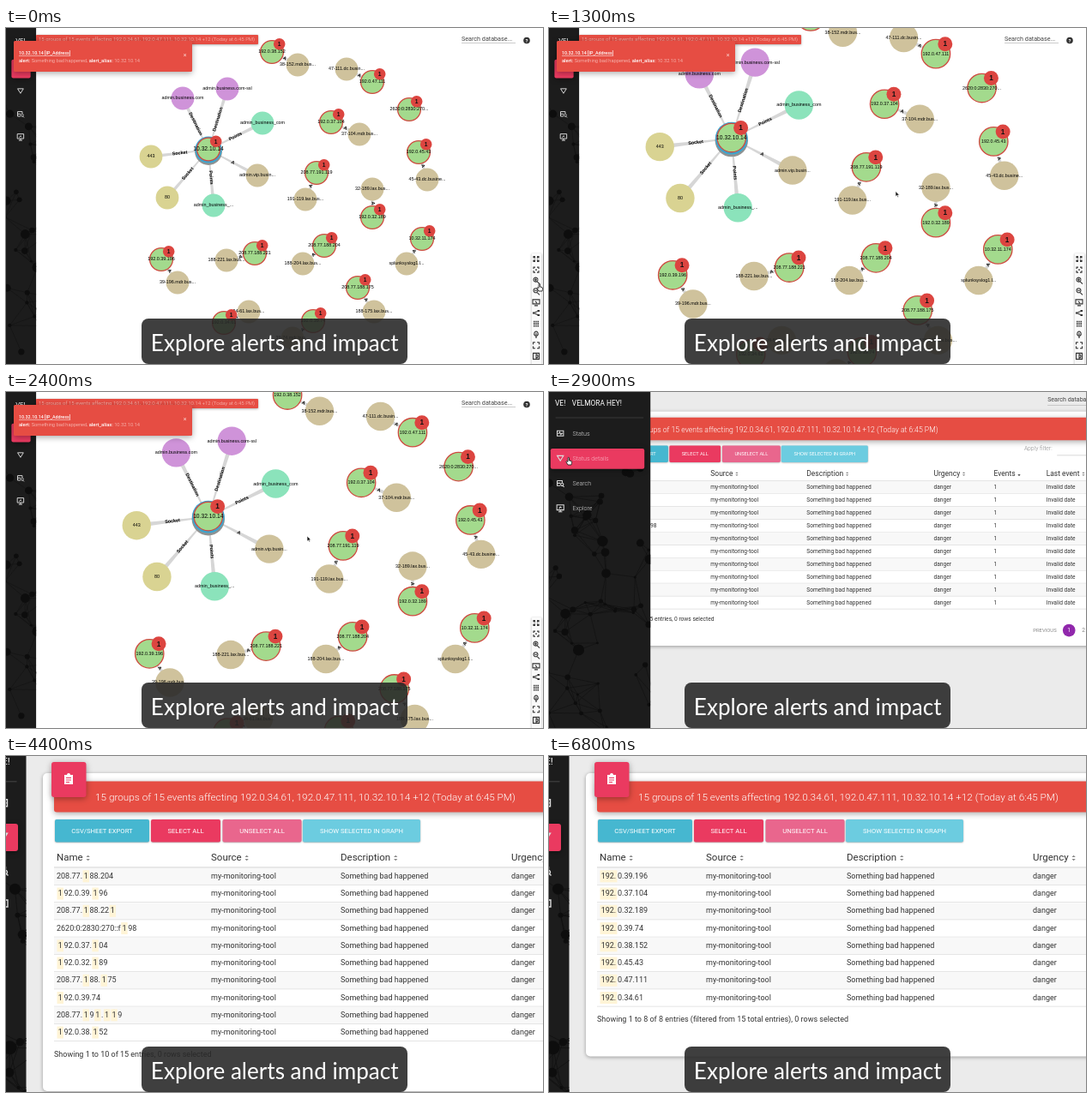
These frames come from a looping animation (626x392 px, 7100 ms). An HTML page with a canvas:

```html
<!DOCTYPE html>
<html lang="en">
<head>
<meta charset="utf-8">
<title>Alerts and impact</title>
<style>
html, body { margin: 0; width: 100%; height: 100%; overflow: hidden; background: #fff; }
canvas { display: block; width: 626px; height: 392px; }
</style>
</head>
<body>
<canvas id="stage" width="626" height="392"></canvas>
<script>
const ctx = document.getElementById('stage').getContext('2d');
const LOOP = 7100, TAU = Math.PI * 2;
const HEADLINE = '15 groups of 15 events affecting 192.0.34.61, 192.0.47.111, 10.32.10.14 +12 (Today at 6:45 PM)';
const RED = '#e64d43', PINK = '#ea3a60';

const clamp = v => Math.max(0, Math.min(1, v));
const progress = (t, from, to) => clamp((t - from) / (to - from));
const smooth = p => p * p * (3 - 2 * p);
const easeOut = (p, power) => 1 - (1 - p) ** power;
const mix = (a, b, p) => a + (b - a) * p;

// Drawing helpers
function text(s, x, y, size, color = '#333', { weight = 400, align = 'left', font = 'Roboto' } = {}) {
  ctx.font = `${weight} ${size}px "${font}", sans-serif`;
  ctx.textAlign = align;
  ctx.textBaseline = 'middle';
  ctx.fillStyle = color;
  ctx.fillText(s, x, y);
  return ctx.measureText(s).width;
}
function box(x, y, w, h, fill, radius = 0, shadow = 0) {
  ctx.save();
  if (shadow) {
    ctx.shadowColor = 'rgba(0,0,0,.35)';
    ctx.shadowBlur = shadow;
    ctx.shadowOffsetY = shadow / 4;
  }
  ctx.fillStyle = fill;
  ctx.beginPath();
  ctx.roundRect(x, y, w, h, radius);
  ctx.fill();
  ctx.restore();
}
function circle(x, y, r, fill, stroke, width = 1) {
  ctx.beginPath();
  ctx.arc(x, y, r, 0, TAU);
  if (fill) { ctx.fillStyle = fill; ctx.fill(); }
  if (stroke) { ctx.strokeStyle = stroke; ctx.lineWidth = width; ctx.stroke(); }
}
function path(d, x, y, scale, stroke, fill, width = 1) {
  ctx.save();
  ctx.translate(x, y);
  ctx.scale(scale, scale);
  const shape = new Path2D(d);
  if (fill) { ctx.fillStyle = fill; ctx.fill(shape); }
  if (stroke) { ctx.strokeStyle = stroke; ctx.lineWidth = width; ctx.stroke(shape); }
  ctx.restore();
}

// Graph
const GREEN = '#a3da8d', BEIGE = '#cfc29c', PURPLE = '#cf93d9', TEAL = '#8be3bb', YELLOW = '#d9d392';
const HUB = { x: 236, y: 142 };
const SPOKES = [
  [206, 82, PURPLE, 'admin.business.com', 'Destination'],
  [258, 71, PURPLE, 'admin.business.com-ssl', 'Destination'],
  [299, 111, TEAL, 'admin_business_com', 'Points'],
  [293, 172, BEIGE, 'admin.vip.busin...', 'A'],
  [242, 207, TEAL, 'admin_business_...', 'Points'],
  [188, 198, YELLOW, '80', 'Socket'],
  [169, 150, YELLOW, '443', 'Socket']
];
const PAIRS = [
  [310, 28, '192.0.38.152', 340, 43, '38-152.mdr.bus...'],
  [427, 63, '192.0.47.111', 397, 48, '47-111.dc.busin...'],
  [470, 95, '2620:0:2830:270...'],
  [379, 110, '192.0.37.104', 412, 124, '37-104.mdr.bus...'],
  [481, 145, '192.0.45.43', 491, 177, '45-43.dc.busine...'],
  [362, 169, '208.77.191.119', 349, 200, '191-119.lax.bus...'],
  [427, 221, '192.0.32.189', 427, 188, '32-189.lax.bus...'],
  [485, 246, '10.32.11.174', 467, 275, 'splunksyslog1.l...'],
  [371, 254, '208.77.188.204', 346, 275, '188-204.lax.bus...'],
  [290, 263, '208.77.188.221', 257, 271, '188-221.lax.bus...'],
  [181, 270, '192.0.39.196', 200, 297, '39-196.mdr.bus...'],
  [410, 303, '208.77.188.175', 429, 331, '188-175.lax.bus...'],
  [254, 344, '192.0.34.61', 283, 331, '34-61.lax.bus...'],
  [358, 342, '192.0.39.74', 334, 362, '39-74.mdr.bus...']
];

function drawGraph(zoom, pan) {
  const X = x => 330 + (x - 330) * zoom + pan.x;
  const Y = y => 196 + (y - 196) * zoom + pan.y;
  const r = 13.4 * zoom;
  const label = (s, x, y, size = 5.4, weight = 400) =>
    text(s, x, y, size, '#000', { weight, align: 'center', font: 'Liberation Sans' });

  function edge(leafX, leafY, x, y, name) {
    const dx = X(x) - X(leafX), dy = Y(y) - Y(leafY), angle = Math.atan2(dy, dx);
    ctx.save();
    ctx.translate(X(leafX), Y(leafY));
    ctx.rotate(angle);
    const length = Math.hypot(dx, dy), half = 2.1 * zoom;
    ctx.fillStyle = '#d6d6d6';
    ctx.beginPath();
    ctx.moveTo(0, -half); ctx.lineTo(length, -.5); ctx.lineTo(length, .5); ctx.lineTo(0, half);
    ctx.fill();
    ctx.translate(length / 2, 0);
    if (Math.abs(angle) > Math.PI / 2) ctx.rotate(Math.PI);
    label(name, 0, 0, 5.4, 700);
    ctx.restore();
  }
  function node(x, y, fill, name) {
    circle(X(x), Y(y), r, fill);
    label(name, X(x), Y(y));
  }
  function alertNode(x, y, name, size) {
    circle(X(x), Y(y), r, GREEN, '#cf4a40', 1.3);
    label(name, X(x), Y(y), size);
    const bx = X(x + 8.7), by = Y(y - 9.2);
    circle(bx, by, 6.8 * zoom, '#dc4540');
    text('1', bx, by + .4, 6.6 * zoom, '#111', { weight: 700, align: 'center', font: 'Liberation Sans' });
  }

  for (const [x, y, , , name] of SPOKES) edge(x, y, HUB.x, HUB.y, name);
  for (const [x, y, , bx, by] of PAIRS) if (bx) edge(bx, by, x, y, 'A');
  for (const [x, y, fill, name] of SPOKES) node(x, y, fill, name);
  for (const [x, y, name, bx, by, host] of PAIRS) {
    if (bx) node(bx, by, BEIGE, host);
    alertNode(x, y, name);
  }
  circle(X(HUB.x), Y(HUB.y + 2), r + 2.5, '#8f9292');
  circle(X(HUB.x), Y(HUB.y), r + 2.2, '#3aa5cf');
  alertNode(HUB.x, HUB.y - .5, '10.32.10.14', 6.7);
}

const TOOLS = [
  'M-3-3L-1-1M3-3L1-1M-3 3L-1 1M3 3L1 1M-3-1V-3H-1M1-3H3V-1M-3 1V3H-1M1 3H3V1',
  'M-3-1V-3H-1M1-3H3V-1M-3 1V3H-1M1 3H3V1M-.8 0H.8M0-.8V.8',
  'M2-1A2.5 2.5 0 1 1 2-1.1M1 1L4 4M-2-1H1M-.5-2.5V.5',
  'M2-1A2.5 2.5 0 1 1 2-1.1M1 1L4 4M-2-1H1',
  'M-4-3H4V2H-4ZM-2 4H2M-1-1L1 1',
  'M-3 0L3-2.5M-3 0L3 2.5M-3.5-.5H-2V.5H-3.5ZM2-3H3.5V-2H2ZM2 2H3.5V3H2Z',
  'M-3-2.5H-1.5M-.7-2.5H.7M1.5-2.5H3M-3 0H-1.5M-.7 0H.7M1.5 0H3M-3 2.5H-1.5M-.7 2.5H.7M1.5 2.5H3',
  'M-1 1.5C-4-1-1-4 0-3.5C1-4 4-1 1 1.5ZM-1 3.2H1M0-2V1',
  'M-3.5-1V-3.5H-1M1-3.5H3.5V-1M-3.5 1V3.5H-1M1 3.5H3.5V1',
  'M-3.5-3.5H3.5V3.5H-3.5ZM0-2A2 2 0 0 1 0 2Z'
];

function drawGraphPanels() {
  text('Search database...', 531, 13, 7.2, '#444');
  box(531, 17, 63, .7, '#bbb');
  circle(607, 14.5, 3.8, '#333');
  text('?', 607, 15, 6, '#fff', { weight: 700, align: 'center' });
  box(612.5, 263, 12, 135, '#fafafa', 1, 2);
  TOOLS.forEach((d, i) => path(d, 618, 269.5 + i * 12.6, 1, '#333', null, i === 6 ? 1.7 : 1.1));
}
function drawToasts() {
  box(35, 8, 259, 11, RED, 1, 3);
  text(HEADLINE, 38, 13.7, 6.05, '#f9cfca', { weight: 300 });
  box(9, 15, 208, 36, RED, 1.5, 7);
  const w = text('10.32.10.14 [IP_Address]', 15, 29, 5.35, '#fff', { weight: 500 });
  box(15, 32, w, .6, '#fff');
  let x = 15;
  for (const [s, weight] of [['alert: ', 500], ['Something bad happened, ', 300], ['alert_alias: ', 500], ['10.32.10.14', 300]])
    x += text(s, x, 38, 5.75, weight === 500 ? '#fff' : '#fbdad6', { weight });
  text('×', 208.5, 32, 7, '#fbdad6', { align: 'center' });
}

// Sidebar
let seed = 11;
const random = () => (seed = seed * 16807 % 2147483647) / 2147483647;
const WEB = Array.from({ length: 64 }, () => ({ x: -30 + random() * 175, y: 110 + random() * 450, r: 2 + random() ** 2 * 7 }));
const MENU = [
  ['Status', 'M-5-4H5V4H-5ZM-4 0H-2L-1-2L1 2L2 0H4'],
  ['Status details', 'M-5-4H5L0 4Z'],
  ['Search', 'M-5-4H3V-1M-5-4V4H0M-5 0H0M5 2A2.2 2.2 0 1 1 5 1.9M4 4L6 6'],
  ['Explore', 'M-5.5-5H5.5V3H-5.5ZM-3 6H3M0 3V6M-2 1L0-2L2 0']
];

function drawSidebar(width, labelAlpha, active) {
  ctx.save();
  ctx.beginPath();
  ctx.rect(-40, -30, width + 40, 620);
  ctx.clip();
  box(-40, -30, 200, 620, '#1c1c1c');
  ctx.strokeStyle = '#111';
  ctx.lineWidth = .8;
  ctx.beginPath();
  for (const a of WEB) for (const b of WEB)
    if (a.y < b.y && Math.hypot(a.x - b.x, a.y - b.y) < 52) { ctx.moveTo(a.x, a.y); ctx.lineTo(b.x, b.y); }
  ctx.stroke();
  for (const p of WEB) circle(p.x, p.y, p.r, '#0d0d0d');
  text('VE!', -12, 7, 11.5, '#fff');
  box(-11, 29.5, width, .8, '#555');
  box(-19, 79 - (active === 0 ? 39 : 0), width + 9.5, 32, PINK, 3, 6);
  const slide = (1 - labelAlpha) * 14;
  ctx.globalAlpha = labelAlpha;
  text('VELMORA HEY!', 15 - slide, 7, 11.3, '#fff');
  ctx.globalAlpha = 1;
  MENU.forEach(([name, icon], i) => {
    const y = 54.8 + i * 39.4;
    path(icon, -3.5, y, 1, '#ddd', null, 1.4);
    ctx.globalAlpha = labelAlpha;
    text(name, 16 - slide, y + .5, 9.6, i === active ? '#f9b3c2' : '#ddd', { weight: 300 });
    ctx.globalAlpha = 1;
  });
  ctx.restore();
}

// Table page, laid out at its closest camera position
const HOSTS = ['208.77.188.204', '192.0.39.196', '208.77.188.221', '2620:0:2830:270::f198', '192.0.37.104',
  '192.0.32.189', '208.77.188.175', '192.0.39.74', '208.77.191.119', '192.0.38.152', '192.0.45.43',
  '192.0.47.111', '192.0.34.61', '10.32.10.14', '10.32.11.174'];
const HEADERS = ['Name', 'Source', 'Description', 'Urgency', 'Events', 'Last event'];
const CELLS = ['my-monitoring-tool', 'Something bad happened', 'danger', '1', 'Invalid date'];
const BUTTONS = [
  [57, 110, '#46b7d0', 'CSV/SHEET EXPORT'],
  [169, 81, PINK, 'SELECT ALL'],
  [252.5, 92, '#e9668d', 'UNSELECT ALL'],
  [346, 137, '#6ccce0', 'SHOW SELECTED IN GRAPH']
];
const ROW = 20.25;

function highlighted(name, query, x, y) {
  const parts = query ? name.split(query) : [name];
  parts.forEach((part, i) => {
    if (i) {
      ctx.font = '400 9px "Roboto", sans-serif';
      const w = ctx.measureText(query).width;
      box(x + .5, y - 7, w + 2.4, 14, '#fff4d6');
      text(query, x + 1.7, y, 9);
      x += w + 3.4;
    }
    x += text(part, x, y, 9);
  });
}

function drawTable(query, columns) {
  const matches = HOSTS.filter(h => h.includes(query));
  const rows = matches.slice(0, 10);
  const footer = 145.5 + rows.length * ROW;
  const narrowed = matches.length < HOSTS.length;

  box(-40, -30, 1100, 700, '#ebebeb');
  text('Search database...', 767, 1.5, 9.6, '#444');
  box(767, 10, 90, 1, '#bbb');
  box(43, 20, 900, footer + 23, '#fff', 5, 4);
  box(56, 29.5, 880, 36, RED, 3, 7);
  text(HEADLINE, 104, 49, 11.75, '#fff', { weight: 300 });
  box(53, 7, 40.5, 41, PINK, 3, 7);
  path('M-5-5H-2A2 2 0 0 1 2-5H5V6H-5Z', 73, 27, 1, null, '#fff');
  path('M-3-1.5H3M-3 1H3M-3 3.5H1', 73, 27, 1, PINK, null, 1.2);

  for (const [x, w, fill, name] of BUTTONS) {
    box(x, 74, w, 26.5, fill, 2, 2);
    text(name, x + w / 2, 87.5, 7.7, '#fff', { align: 'center' });
  }
  text('Apply filter:', 730, 79, 9.2, '#888', { weight: 300 });
  box(782, 89, 80, 1, '#ccc');

  HEADERS.forEach((name, i) => {
    const x = columns[i], end = x + text(name, x, 118.5, 11.5) + 5;
    if (name !== 'Events') path('M-2.2-.9L0-3.2L2.2-.9Z', end + 1, 119, 1, null, '#888');
    path('M-2.2.9L0 3.2L2.2.9Z', end + 1, 119, 1, null, name === 'Events' ? '#222' : '#888');
  });
  box(56, 129.6, 880, 1, '#ccc');
  rows.forEach((name, i) => {
    const y = 140.3 + i * ROW;
    if (i % 2 === 0) box(56, y - 9.6, 880, ROW - 1, '#f8f8f8');
    box(56, y + 9.6, 880, .9, '#dcdcdc');
    highlighted(name, query, 59, y);
    CELLS.forEach((cell, j) => text(cell, columns[j + 1], y, 9));
  });
  const total = narrowed ? ' (filtered from 15 total entries)' : '';
  text(`Showing 1 to ${rows.length} of ${matches.length} entries${total}, 0 rows selected`, 56, footer + .3, 9);
  text('PREVIOUS', 744, footer + 18.5, 8, '#888');
  circle(801, footer + 18.5, 10, '#9128ac');
  text('1', 801, footer + 18.5, 9, '#fff', { align: 'center' });
  text('2', 824, footer + 18.5, 9, '#888', { align: 'center' });
}

// Table states: start time, query, then source, description and urgency columns
const STATES = [
  [0, '', 234, 386, 587],
  [4400, '1', 239, 390, 589],
  [4700, '19', 239, 390, 589],
  [5400, '192', 183, 347, 564],
  [5800, '192.', 183, 347, 564]
];

function withCamera(k, draw) {
  ctx.save();
  ctx.translate(60, 30);
  ctx.scale(k, k);
  ctx.translate(-60, -30);
  draw();
  ctx.restore();
}
function arrow(x, y) {
  path('M0 0V6.5L1.6 5.2L2.6 7.4L3.7 6.9L2.7 4.8H4.8Z', x, y, .95, '#fff', '#111', .7);
}
function hand(x, y) {
  path('M-1-4C-1-5 .5-5 .5-4V-1L3-.5C4 0 3.5 2 3 4H-1L-3 .5C-3-.5-2-.5-1 .5Z', x, y, 1, '#222', '#fff', .9);
}
function drawCaption() {
  box(158, 339, 310, 53, 'rgba(40,40,40,.89)', 8);
  text('Explore alerts and impact', 313.2, 369.5, 26.1, '#fff', { align: 'center', font: 'Lato' });
}

const WIDE = 1 / 1.474;
function draw(t) {
  ctx.fillStyle = '#fff';
  ctx.fillRect(0, 0, 626, 392);
  if (t < 2800) {
    const zoom = 1 + .247 * easeOut(progress(t, 100, 900), 1.45);
    const drag = easeOut(progress(t, 1800, 2500), 2);
    const pan = { x: 23.5 * drag, y: 17.4 * drag };
    drawGraph(zoom, pan);
    drawGraphPanels();
    withCamera(WIDE, () => drawSidebar(23.3, 0, 0));
    drawToasts();
    const reach = smooth(progress(t, 900, 1500));
    if (reach === 0) hand(622, 303);
    else arrow(mix(621, 328, reach) + pan.x, mix(303, 151, reach) + pan.y);
  } else {
    const [, query, source, description, urgency] = STATES.findLast(s => t >= s[0]);
    const columns = [59, source, description, urgency, urgency + 95, urgency + 178];
    const closing = easeOut(progress(t, 3100, 3500), 3);
    withCamera(mix(WIDE, 1, smooth(progress(t, 2780, 3220))), () => {
      drawTable(query, columns);
      drawSidebar(mix(139, 23.5, closing), closing < 1 ? 1 - .8 * closing : 0, 1);
    });
    if (t < 3100) hand(23, 81);
  }
  drawCaption();
}

function tick() {
  draw(Math.floor(performance.now() % LOOP / 100) * 100);
  requestAnimationFrame(tick);
}
tick();
</script>
</body>
</html>
```
